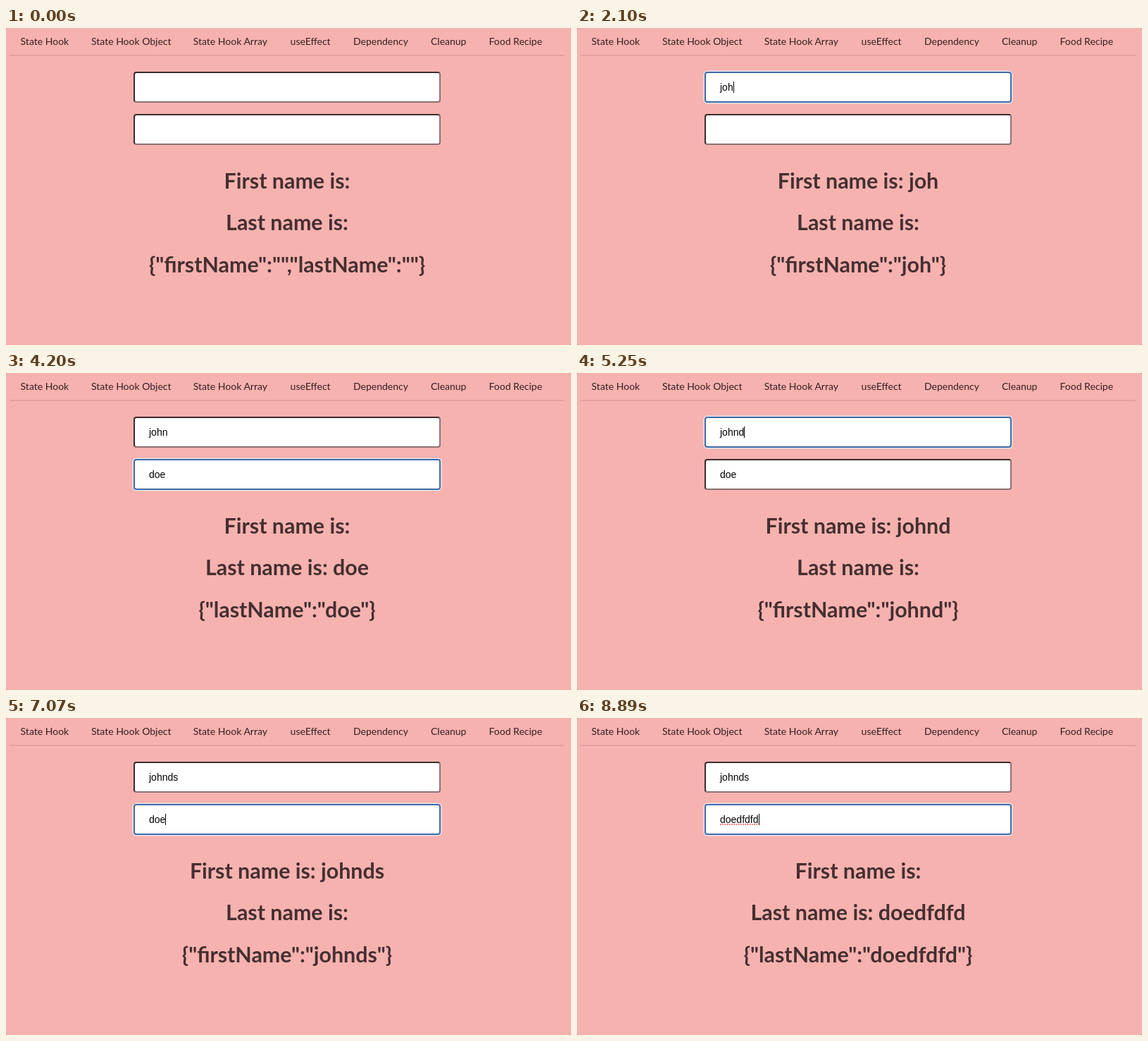
Animation of 802x450 px, one loop 8960 ms. Source, as an HTML page:

```html
<!DOCTYPE html>
<html lang="en">
<head>
<meta charset="utf-8">
<title>State Hook Object</title>
<style>
  html, body {
    margin: 0;
    width: 100%;
    height: 100%;
    overflow: hidden;
    background: #9a7574;
  }
  #stage {
    position: absolute;
    left: 0;
    top: 0;
    width: 802px;
    height: 450px;
    overflow: hidden;
    border-radius: 2px;
    background: #f6b2af;
  }
  .rule {
    position: absolute;
    left: 5px;
    top: 38px;
    width: 788px;
    height: 2px;
    background: #e3a19f;
  }
  .field {
    position: absolute;
    left: 181px;
    box-sizing: border-box;
    width: 436px;
    height: 44px;
    border: 2px solid;
    border-color: #3a2c2d #8d7273 #8d7273 #3a2c2d;
    border-radius: 4px;
    background: #fff;
  }
  .field.focus {
    border-color: #3f6ba5;
    box-shadow: 0 0 0 1.5px #e6e4ee;
  }
  svg { position: absolute; left: 0; top: 0; }
  .nav { font: 14px Lato, sans-serif; fill: #351f20; }
  .head { font: 700 30.4px Lato, sans-serif; fill: #452f30; text-anchor: middle; }
  .value { font: 14px "Liberation Sans", Arial, sans-serif; fill: #000; }
  #typo { stroke: #e0524d; stroke-width: 1.5; stroke-dasharray: 2 1.2; }
</style>
</head>
<body>
<div id="stage">
  <div class="rule"></div>
  <div class="field" style="top:62px"></div>
  <div class="field" style="top:122px"></div>
  <svg width="802" height="450">
    <g class="nav">
      <text x="20.6" y="24">State Hook</text>
      <text x="121" y="24">State Hook Object</text>
      <text x="265.7" y="24">State Hook Array</text>
      <text x="403.6" y="24">useEffect</text>
      <text x="493" y="24">Dependency</text>
      <text x="603" y="24">Cleanup</text>
      <text x="685.5" y="24">Food Recipe</text>
    </g>
    <text class="value" x="203" y="89"></text>
    <text class="value" x="203" y="149"></text>
    <line id="typo" x1="203" x2="257.5" y1="151" y2="151"/>
    <rect id="caret" width="1" height="16"/>
    <g class="head">
      <text id="first" x="399" y="228"></text>
      <text id="last" x="399" y="287"></text>
      <text id="json" x="399" y="347"></text>
    </g>
  </svg>
</div>
<script>
  const LOOP = 8960, BLINK = 490, TYPO_AT = 8120;
  const KEYS = ["firstName", "lastName"];

  // [time, field, typed letter]; no letter means a click into the field
  const EVENTS = [
    [1050, 0], [1680, 0, "j"], [1890, 0, "o"], [2030, 0, "h"], [2170, 0, "n"],
    [2660, 1], [2740, 1], [3290, 1, "d"], [3500, 1, "o"], [3710, 1, "e"],
    [4620, 0], [5110, 0, "d"], [5880, 0, "s"],
    [6790, 1], [7140, 1, "d"], [7350, 1, "f"], [7490, 1, "d"], [7560, 1, "f"], [7700, 1, "d"]
  ];

  const $ = id => document.getElementById(id);
  const fields = document.querySelectorAll(".field");
  const labels = document.querySelectorAll(".value");
  const caret = $("caret"), typo = $("typo");

  function setText(el, text) {
    if (el.textContent !== text) el.textContent = text;
  }

  function stateAt(t) {
    const values = ["", ""];
    let name = { firstName: "", lastName: "" }, focus = -1, since = 0;
    for (const [time, field, letter] of EVENTS) {
      if (time > t) break;
      focus = field;
      since = time;
      if (letter) {
        values[field] += letter;
        name = { [KEYS[field]]: values[field] };
      }
    }
    return { values, name, focus, since };
  }

  function draw(t) {
    const { values, name, focus, since } = stateAt(t);
    values.forEach((value, i) => {
      setText(labels[i], value);
      fields[i].classList.toggle("focus", i === focus);
    });
    setText($("first"), "First name is: " + (name.firstName || ""));
    setText($("last"), "Last name is: " + (name.lastName || ""));
    setText($("json"), JSON.stringify(name));

    const lit = focus >= 0 && Math.floor((t - since) / BLINK) % 2 === 0;
    caret.style.display = lit ? "" : "none";
    if (lit) {
      const width = values[focus] ? labels[focus].getComputedTextLength() : 0;
      caret.setAttribute("x", Math.round(203 + width));
      caret.setAttribute("y", 76 + 60 * focus);
    }
    typo.style.display = t >= TYPO_AT ? "" : "none";
  }

  const start = performance.now();
  function tick() {
    draw((performance.now() - start) % LOOP);
    requestAnimationFrame(tick);
  }
  tick();
</script>
</body>
</html>
```
